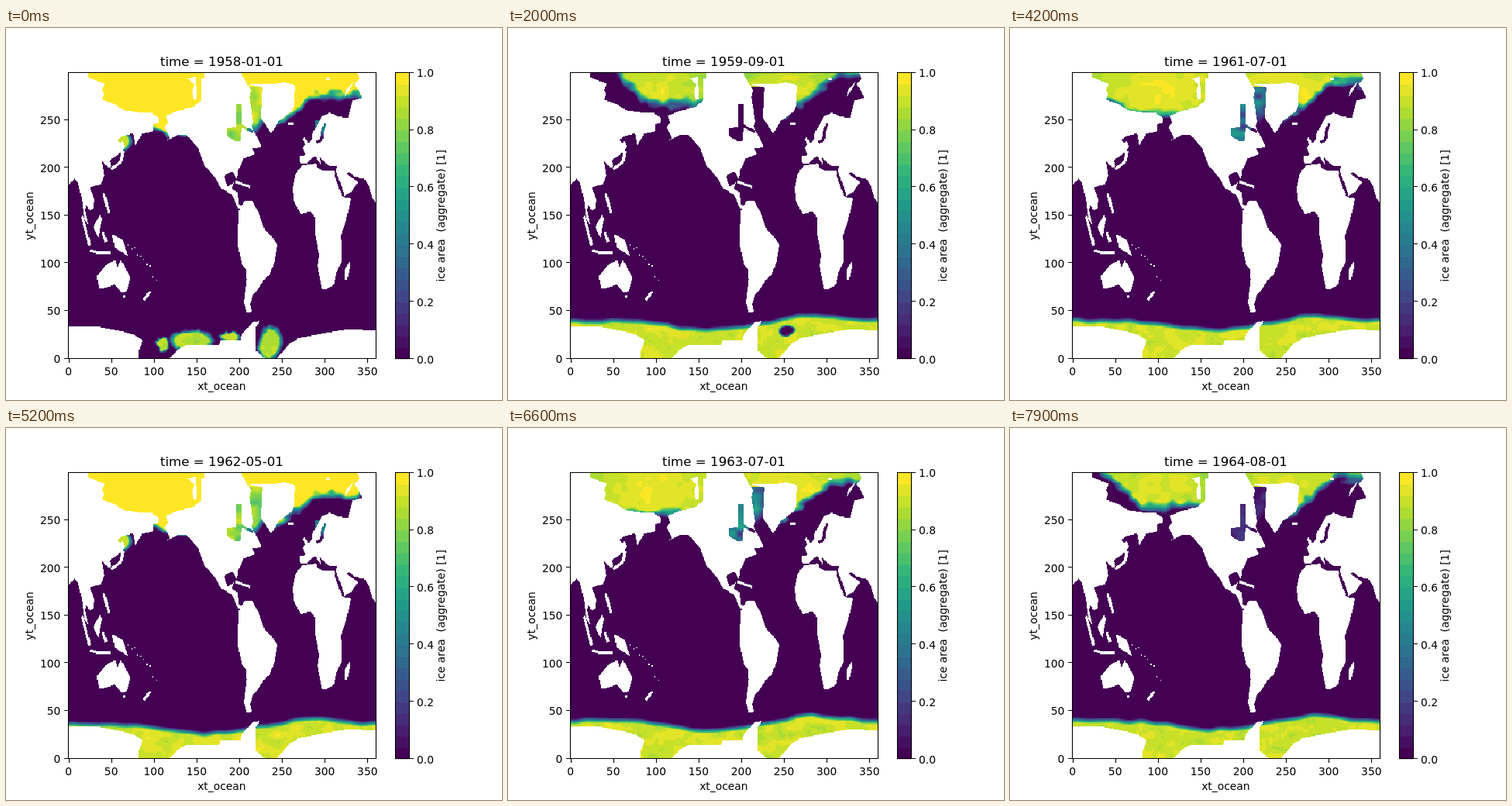
These frames come from a looping animation (640x480 px, 8 s). An HTML page with a canvas:

```html
<!DOCTYPE html>
<html lang="en">
<head>
<meta charset="utf-8">
<title>Sea ice by month</title>
<style>
html, body { margin: 0; width: 100%; height: 100%; overflow: hidden; background: #fff; }
canvas, svg { position: absolute; left: 0; top: 0; width: 640px; height: 480px; }
text { font: 13.89px "DejaVu Sans", sans-serif; white-space: pre; fill: #000; }
#title { font-size: 16.67px; }
</style>
</head>
<body>
<canvas id="map" width="640" height="480"></canvas>
<svg id="chart" viewBox="0 0 640 480"></svg>
<script>
const LEFT = 80, TOP = 57.6, WIDTH = 396.8, HEIGHT = 369.6, COLS = 360, ROWS = 300;
const BOTTOM = TOP + HEIGHT, STEP_MS = 100, STEPS = 80, BANDS = 25;

// Outlines in stage coordinates
const COASTS = {
  asia: 'M78 50H107V64L128 72 124 80 127 85 124 92 139 98 152 106 172 109 188 109 197 116V122L190 124V133L175 137 167 152 164 136 152 139 143 144 152 153 150 159 134 171 136 179 132 180 124 172 127 190 123 201 108 206 114 221 113 232 108 236 104 228 102 235 107 255 101 246 98 222 93 199 88 194 78 207Z',
  northAmerica: 'M256 50V65H252V93L242 102 222 107 206 113 209 122 204 128 212 142 202 148 222 138 232 137 247 154 257 179 268 190 277 206 292 216 298 230 303 235 307 230 301 228 299 212 291 208 294 199 286 205 281 191 292 185 298 195 300 183 306 169 322 162 317 156 330 153 317 127 319 120 314 90 316 80 304 60V50Z',
  arcticIsles: 'M235 66L245 62 247 92 242 93 240 82 243 73Z',
  southAmerica: 'M301 235L308 223 318 223 326 239 329 247 334 261 343 269 350 280 346 302 341 318 334 323 325 337 319 344 315 356 317 366 311 367 307 354 311 325 310 312 304 305 299 278 300 250Z',
  greenland: 'M311 72L345 73 358 70 373 74 372 100 368 108 352 120 342 136 329 116 331 77Z',
  europe: 'M480 50H449L456 66 450 72 460 90 447 94 441 116 428 114 418 109 408 114 396 135 395 144 383 154 387 164 379 165V174L388 175 392 170 399 166 407 177 405 167 412 174 419 179 427 178 426 186 436 217 446 211 454 199 451 195 462 194 469 205 473 219 480 232Z',
  barrier: 'M437 90L440 78 449 69 443 80Z',
  africa: 'M382 177L400 175 401 180 411 185 424 185 431 210 436 218 445 220 439 248 432 268 433 301 427 314 423 331 414 337H408L402 307 404 293 399 268 398 243 393 237 380 240 371 222 370 206 374 188Z',
  madagascar: 'M443 301L444 308 440 325H437V313Z',
  australia: 'M117 320L131 304 141 300 144 309 148 299 161 322 156 340 149 341 140 331 126 336H120Z',
  newGuinea: 'M137 266L150 273 158 295 140 283Z',
  borneo: 'M113 257L121 241 124 246 119 270Z',
  antarctica: 'M78 430V386H122L152 392 166 396 176 403 172 415V426H211L222 415 233 409H275L277 403H302L304 395 318 380 327 378 322 387V416L334 426H350L367 407 378 400 415 393 440 389 470 390H480V430Z'
};
const ISLAND_ARCS = 'M136 182L148 173 151 159M149 147L151 154M98 243L108 280M108 287L119 290 135 290M126 213L133 239M125 263L129 276M186 340L178 351M296 198L306 202 315 205M364 124H371M384 142L389 150M150 347H154M413 66H418';
const BAYS = 'M285 129L304 127 302 146 297 147 285 139ZM297 98H304V130H297Z';
const STRAITS = 'M303 126L319 134M400 147L407 145 408 134 412 123M425 188L435 216M441 187L449 193 456 195';

const VIRIDIS = ['440154', '482878', '3e4989', '31688e', '26828e', '1f9e89', '35b779', '6ece58', 'b5de2b', 'fde725']
  .map(hex => [0, 2, 4].map(i => parseInt(hex.slice(i, i + 2), 16)));
const clamp = v => Math.max(0, Math.min(1, v));
const mix = (a, b, k) => a + (b - a) * k;
const bell = (x, center, width) => Math.exp(-(((x - center) / width) ** 2));

function viridis(v) {
  const p = v * 9, i = Math.min(8, Math.floor(p));
  return VIRIDIS[i].map((c, n) => Math.round(mix(c, VIRIDIS[i + 1][n], p - i)));
}
const PALETTE = Array.from({ length: BANDS }, (_, i) => viridis(i / (BANDS - 1)));

function hash(x, y, seed) {
  let h = Math.imul(x, 374761393) ^ Math.imul(y, 668265263) ^ Math.imul(seed + 11, 1274126177);
  h = Math.imul(h ^ (h >>> 13), 1103515245);
  return ((h ^ (h >>> 16)) >>> 0) / 4294967295;
}

// Smooth noise from -1 to 1
function noise(x, y, seed) {
  const ix = Math.floor(x), iy = Math.floor(y);
  const ease = v => v * v * (3 - 2 * v), u = ease(x - ix), v = ease(y - iy);
  return 2 * mix(
    mix(hash(ix, iy, seed), hash(ix + 1, iy, seed), u),
    mix(hash(ix, iy + 1, seed), hash(ix + 1, iy + 1, seed), u), v) - 1;
}

const blob = (x, y, [cx, cy, rx, ry]) => clamp((1.2 - Math.hypot((x - cx) / rx, (y - cy) / ry)) / .42);

function oceanMask() {
  const layer = document.createElement('canvas');
  layer.width = COLS;
  layer.height = ROWS;
  const g = layer.getContext('2d');
  g.scale(COLS / WIDTH, ROWS / HEIGHT);
  g.translate(-LEFT, -TOP);
  g.lineWidth = 3.5;
  Object.values(COASTS).forEach(d => g.fill(new Path2D(d)));
  g.stroke(new Path2D(ISLAND_ARCS));
  for (let i = 0; i < 10; i++) g.fillRect(157 + i * 4, 270 + i * 5 + 12 * hash(i, 1, 1), 1.6, 1.6);
  g.globalCompositeOperation = 'destination-out';
  g.fill(new Path2D(BAYS));
  g.stroke(new Path2D(STRAITS));
  const { data } = g.getImageData(0, 0, COLS, ROWS);
  return Array.from({ length: COLS * ROWS }, (_, i) => data[i * 4 + 3] < 128);
}

// Seasonal state: cold peaks in March in the north, growth in August in the south
function seasonOf(step) {
  const month = step % 12, year = Math.floor(step / 12);
  const cycle = peak => .5 + .5 * Math.cos((month - peak) * Math.PI / 6);
  const cold = cycle(2), growth = cycle(7);
  return {
    step, cold, year,
    melt: (1 - cold) ** 2,
    bayIce: .9 * (1 - (1 - cold) ** 2),
    meltStart: 160 + 22 * Math.cos(2.3 * (year - 1)),
    retreat: 70 * (1 - growth) ** 4,
    summer: growth < .3,
    polynya: year < 3 && growth > .4 && month > 5 && [366 + 8 * Math.cos(2.6 * year), 391, 10, 7]
  };
}

function arcticIce(x, y, s, rough) {
  const folded = Math.min(x, 556 - x);
  const far = Math.hypot((folded - 192) / 75, (y - 80) / 40);
  const pack = 1 - s.melt * (.05 + .12 * far * far - rough * .05);
  if (x < 264) {
    const edge = 98 + 50 * s.cold - (y > 115) * Math.max(0, 206 - x) * .6
      - s.melt * Math.max(0, s.meltStart - x);
    return pack * clamp((edge - y + rough * 4) / (8 + s.melt * 6) + .5);
  }
  const edge = Math.max(122 + 8 * s.cold - .75 * Math.max(0, x - 345), 62 + 34 * s.cold);
  return pack * clamp((edge - y + rough * 5) / 11 + .5);
}

function northIce(x, y, s) {
  const rough = noise(x / 10, y / 8, s.step);
  const bay = s.bayIce * (1 + rough * (1 - s.bayIce));
  if (x < 174 && y > 125) return clamp(2 * s.cold - .6) * blob(x, y, [147, 146, 14, 12]);
  if (x > 264 && x < 312 && y > 92) return bay;
  if (x > 264 && x < 342 && y > 76) {
    const edge = 111 + 28 * s.cold - 1.3 * Math.max(0, x - 322);
    return bay * clamp((edge - y) / 14 + .5);
  }
  if (x > 398 && x < 416 && y > 119) return clamp(s.cold - .35) * clamp((142 - y) / 8);
  return arcticIce(x, y, s, rough);
}

const SUMMER_ICE = [[202, 409, 7, 9], [240, 403, 26, 12], [290, 399, 12, 6], [340, 407, 14, 21]];

function southIce(x, y, s) {
  const rough = noise(x / 13, y / 9, s.step), fine = noise(x / 4, y / 4, s.step + 99);
  const wave = noise(x / 17, 0, s.step) * 1.5;
  const edge = 377 + 12 * bell(x, 260, 65) - 7 * bell(x, 395, 40) + s.retreat + wave;
  const pack = .93 + rough * .045 + fine * .02;
  let ice = pack * clamp((y - edge + 3) / 7.5);
  if (s.summer) for (const b of SUMMER_ICE) ice = Math.max(ice, (pack - .03) * blob(x + rough * 3, y + fine * 2, b));
  if (s.polynya) ice *= 1 - blob(x + rough * 2, y, s.polynya);
  return ice;
}

const ocean = oceanMask();
const cells = document.createElement('canvas');
cells.width = COLS;
cells.height = ROWS;
const cellPen = cells.getContext('2d'), image = cellPen.createImageData(COLS, ROWS);
const pen = document.getElementById('map').getContext('2d');
pen.imageSmoothingEnabled = false;

function drawMap(step) {
  const season = seasonOf(step);
  for (let i = 0; i < ocean.length; i++) {
    const x = LEFT + (i % COLS + .5) * WIDTH / COLS, y = TOP + (Math.floor(i / COLS) + .5) * HEIGHT / ROWS;
    let color = [255, 255, 255];
    if (ocean[i]) {
      const ice = y < 160 ? northIce(x, y, season) : y > 355 ? southIce(x, y, season) : 0;
      color = PALETTE[Math.round(clamp(ice) * (BANDS - 1))];
    }
    image.data.set(color, i * 4);
    image.data[i * 4 + 3] = 255;
  }
  cellPen.putImageData(image, 0, 0);
  pen.drawImage(cells, LEFT, TOP, WIDTH, HEIGHT);
}

function chartMarkup() {
  const label = (x, y, text, anchor = 'middle', extra = '') =>
    `<text x="${x}" y="${y}" text-anchor="${anchor}" ${extra}>${text}</text>`;
  const turned = (x, y, text) => label(0, 0, text, 'middle', `transform="translate(${x} ${y}) rotate(-90)"`);
  const snap = y => Math.ceil(y - .5) - .5;
  let ticks = '', out = '';
  for (let v = 0; v <= 350; v += 50) {
    const x = LEFT + (v + .5) * WIDTH / COLS, y = BOTTOM - (v + .5) * HEIGHT / ROWS;
    ticks += `M${Math.round(x) + .5} 427v5`;
    out += label(x, 448, v);
    if (v > 250) continue;
    ticks += `M80 ${snap(y)}h-5`;
    out += label(70.4, Math.round(y + 5.5), v, 'end');
  }
  const band = HEIGHT / BANDS;
  PALETTE.forEach((c, i) => {
    out += `<rect x="502" y="${BOTTOM - (i + 1) * band}" width="18" height="${band + (i ? .6 : 0)}" fill="rgb(${c})"/>`;
  });
  for (let i = 0; i <= 5; i++) {
    const y = BOTTOM - i * HEIGHT / 5;
    ticks += `M521 ${snap(y)}h5`;
    out += label(530, Math.round(y + 5.3), (i / 5).toFixed(1), 'start');
  }
  return out + `<path d="${ticks}M80.5 57.5h397v369h-397zM502.5 57.5h18v369h-18z" fill="none" stroke="#000" stroke-width="1.11"/>`
    + label(278.4, 467, 'xt_ocean') + turned(35, 242.4, 'yt_ocean') + turned(566, 242.4, 'ice area  (aggregate) [1]')
    + label(278.4, 49, '', 'middle', 'id="title"');
}

document.getElementById('chart').innerHTML = chartMarkup();
const title = document.getElementById('title');
const start = performance.now();
let shown = -1;

function render() {
  const step = Math.floor((performance.now() - start) / STEP_MS) % STEPS;
  if (step !== shown) {
    shown = step;
    drawMap(step);
    title.textContent = `time = ${1958 + Math.floor(step / 12)}-${String(step % 12 + 1).padStart(2, '0')}-01`;
  }
  requestAnimationFrame(render);
}
render();
</script>
</body>
</html>
```
